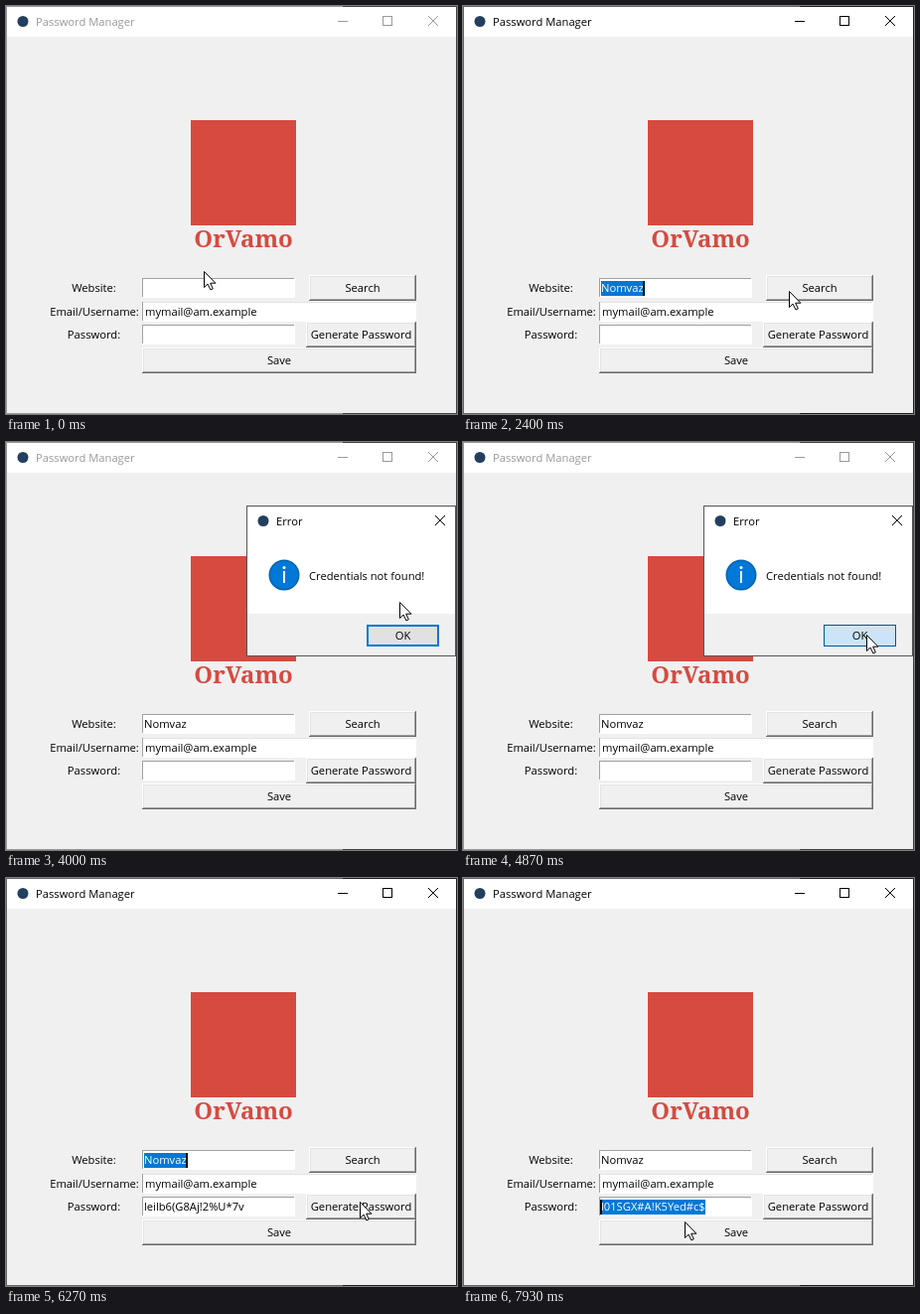
An HTML page with a canvas that plays this animation: 454 px wide and 411 px high, repeating every 8000 ms.

```html
<!DOCTYPE html>
<html lang="en">
<head>
<meta charset="utf-8">
<title>Password Manager</title>
<style>
  html, body { margin: 0; width: 100%; height: 100%; overflow: hidden; background: #f0f0f0; }
  canvas { display: block; width: 454px; height: 411px; }
</style>
</head>
<body>
<canvas id="stage" width="454" height="411"></canvas>
<script>
const ctx = document.getElementById('stage').getContext('2d');
const LOOP = 8000, RATE = 0.015;
const UI_FONT = '11.2px "Open Sans", "Noto Sans", sans-serif';
const RED = '#d64a40', BLUE = '#0078d7', FACE = '#f0f0f0', SHADE = '#a0a0a0';
const SITE = 'Nomvaz', EMAIL = 'mymail@am.example';

const ACTIVATE = 200, TYPE = 730, KEY_GAP = 120, SELECT = 1730;
const SEARCH = 3000, DIALOG_OPEN = 3200, OK_PRESS = 4870, DIALOG_CLOSE = 5000;
const PASSWORD_FOCUS = 7200, DRAG = 7270, DRAG_END = 7600;
const CLICK_HOLD = 66;

// Each click on the generate button yields the next password.
const clicks = [5600, 5930, 6200, 6530];
const passwords = ['lT4m#Zq9(wR2!eKs8', 'h7$Vd!3pXo*Bn6Yc', 'leilb6(G8Aj!2%U*7v', 'l01SGX#A!K5Yed#c$'];

const field = (x, y, w) => ({ x, y, w, h: 20 });
const fields = { site: field(137, 274, 154), email: field(137, 298, 276), password: field(137, 321, 154) };
const okButton = { x: 363, y: 184, w: 73, h: 22 };

const pointerMoves = [
  { at: 70, x: 207, y: 278 },
  { at: 2000, x: 344, y: 288, span: 600 },
  { at: 3470, x: 384, y: 119 },
  { at: 3800, x: 407, y: 194, span: 600 },
  { at: DIALOG_CLOSE, x: 357, y: 326 },
  { at: 6730, x: 254, y: 331 },
  { at: DRAG, x: 130, y: 331 },
  { at: DRAG_END, x: 224, y: 346 }
];

const easeOut = u => 1 - (1 - u) ** 2;
const blink = age => age % 900 < 600;
const hits = (r, x, y) => x >= r.x && x < r.x + r.w && y >= r.y && y < r.y + r.h;
const clamp = (v, lo, hi) => Math.min(hi, Math.max(lo, v));

function pointerAt(t) {
  let x = 200, y = 267;
  for (const { at, x: toX, y: toY, span = 330 } of pointerMoves) {
    const u = easeOut(clamp((t - at) / span, 0, 1));
    x += (toX - x) * u;
    y += (toY - y) * u;
  }
  return [Math.round(x), Math.round(y)];
}

function box(x, y, w, h, color) {
  ctx.fillStyle = color;
  ctx.fillRect(x, y, w, h);
}

function frame(x, y, w, h, color, line = 1) {
  ctx.strokeStyle = color;
  ctx.lineWidth = line;
  ctx.strokeRect(x + line / 2, y + line / 2, w - line, h - line);
}

function disc(x, y, r, color) {
  ctx.fillStyle = color;
  ctx.beginPath();
  ctx.arc(x, y, r, 0, Math.PI * 2);
  ctx.fill();
}

function text(str, x, y, color = '#000', align = 'left', font = UI_FONT) {
  ctx.font = font;
  ctx.textAlign = align;
  ctx.fillStyle = color;
  ctx.fillText(str, x, y);
}

function textWidth(str) {
  ctx.font = UI_FONT;
  return ctx.measureText(str).width;
}

function cross(x, y, color) {
  ctx.strokeStyle = color;
  ctx.lineWidth = 1;
  ctx.beginPath();
  ctx.moveTo(x, y);
  ctx.lineTo(x + 10, y + 10);
  ctx.moveTo(x + 10, y);
  ctx.lineTo(x, y + 10);
  ctx.stroke();
}

function edges(x, y, w, h, topLeft, bottomRight) {
  box(x, y, w, h, bottomRight);
  box(x, y, w - 1, h - 1, topLeft);
}

function button(label, x, y, w, pressed) {
  const h = 26, shift = pressed ? 1 : 0;
  if (pressed) {
    edges(x, y, w, h, '#696969', '#fff');
    edges(x + 1, y + 1, w - 2, h - 2, SHADE, '#e3e3e3');
  } else {
    edges(x, y, w, h, '#fff', '#696969');
    edges(x + 1, y + 1, w - 2, h - 2, '#e3e3e3', SHADE);
  }
  box(x + 2, y + 2, w - 4, h - 4, FACE);
  text(label, x + w / 2 + shift, y + 17 + shift, '#000', 'center');
}

function entry({ x, y, w, h }, str, { border = SHADE, pad = 2, from = 0, to = 0, caret = -1 } = {}) {
  edges(x, y, w, h, border, '#fff');
  box(x, y, 1, h - 1, SHADE);
  box(x + 1, y + 1, w - 2, h - 2, '#fff');
  const textX = x + pad, base = y + 14;
  const at = i => textX + textWidth(str.slice(0, i));
  text(str, textX, base);
  if (to > from) {
    const left = Math.round(at(from)), width = Math.ceil(at(to) - at(from));
    ctx.save();
    ctx.beginPath();
    ctx.rect(left, y + 3, width, 15);
    ctx.clip();
    box(left, y + 3, width, 15, BLUE);
    text(str, textX, base, '#fff');
    ctx.restore();
  }
  if (caret >= 0) box(Math.round(at(caret)) - 1, y + 3, 2, 15, '#000');
}

function mainWindow(active) {
  const ink = active ? '#000' : '#999', edge = active ? '#222' : '#444';
  box(0, 0, 454, 411, FACE);
  box(1, 1, 452, 30, '#fff');
  frame(0, 0, 454, 411, active ? '#666' : '#999');
  box(339, 0, 115, 1, edge);
  box(339, 410, 115, 1, edge);
  box(453, 0, 1, 411, edge);

  disc(17, 15.5, 5.5, '#233f5e');
  text('Password Manager', 30, 20, ink);
  box(334, 15, 10, 1, ink);
  frame(379, 10, 10, 10, ink);
  cross(425, 10, ink);

  box(186, 115, 106, 106, RED);
  text('OrVamo', 239, 243, RED, 'center', 'bold 24px "Noto Serif", serif');

  text('Website:', 88.5, 288, '#000', 'center');
  text('Email/Username:', 89, 312, '#000', 'center');
  text('Password:', 88.5, 335, '#000', 'center');
}

function dialog(pressed, hover) {
  box(242, 64, 211, 152, '#555');
  box(243, 65, 209, 108, '#fff');
  box(243, 173, 209, 42, FACE);
  disc(259, 79.5, 5.5, '#233f5e');
  text('Error', 272, 84);
  cross(432, 74, '#000');

  disc(280, 134, 15.5, '#0063b1');
  disc(280, 134, 14, BLUE);
  box(279, 130, 2, 12, '#fff');
  disc(280, 126.5, 1.5, '#fff');
  text('Credentials not found!', 305, 139);

  const { x, y, w, h } = okButton;
  box(x, y, w, h, pressed ? '#cce4f7' : hover ? '#e5f1fb' : '#e1e1e1');
  frame(x, y, w, h, pressed ? '#005499' : BLUE, pressed ? 1 : 2);
  text('OK', x + w / 2, y + 15, '#000', 'center');
}

function arrow(x, y) {
  ctx.save();
  ctx.translate(x - 0.5, y + 0.5);
  const outline = new Path2D('M0 0V16L3.6 12.6L6.4 18.4L8.8 17.3L6.2 11.7H11.4Z');
  ctx.fillStyle = '#fff';
  ctx.fill(outline);
  ctx.strokeStyle = '#000';
  ctx.lineWidth = 1;
  ctx.stroke(outline);
  ctx.restore();
}

function beam(x, y) {
  box(x, y - 7, 1, 14, '#000');
  for (const serifY of [y - 8, y + 7]) {
    box(x - 3, serifY, 3, 1, '#000');
    box(x + 1, serifY, 3, 1, '#000');
  }
}

function dragIndex(str, x) {
  const textX = fields.password.x + 2;
  let i = str.length;
  while (i > 0 && textX + textWidth(str.slice(0, i)) > x + 3) i--;
  return i;
}

function draw(t) {
  const [x, y] = pointerAt(t);
  const modal = t >= DIALOG_OPEN && t < DIALOG_CLOSE;
  const active = t >= ACTIVATE && !modal;
  const dragged = t >= DRAG + CLICK_HOLD;
  mainWindow(active);

  const typed = clamp(Math.floor((t - TYPE) / KEY_GAP) + 1, 0, SITE.length);
  const focus = t < DIALOG_OPEN ? 600 : DIALOG_CLOSE;
  entry(fields.site, SITE.slice(0, typed), {
    to: t >= SELECT && !modal && !dragged ? typed : 0,
    caret: active && t < PASSWORD_FOCUS && blink(t - focus) ? typed : -1
  });
  entry(fields.email, EMAIL, { border: '#e3e3e3', pad: 3 });

  const made = clicks.filter(c => t >= c + CLICK_HOLD).length;
  const password = made ? passwords[made - 1] : '';
  const start = dragged ? dragIndex(password, t < DRAG_END ? x : 0) : password.length;
  entry(fields.password, password, {
    from: start, to: password.length, caret: t >= PASSWORD_FOCUS ? start : -1
  });

  button('Search', 305, 271, 108, t >= SEARCH && t < DIALOG_OPEN);
  button('Generate Password', 302, 318, 111, clicks.some(c => t >= c && t < c + CLICK_HOLD));
  button('Save', 137, 344, 276, false);

  if (modal) dialog(t >= OK_PRESS, hits(okButton, x, y));
  const overField = Object.values(fields).some(f => hits(f, x, y));
  const dragging = t >= DRAG && t < DRAG_END + CLICK_HOLD;
  (overField || dragging ? beam : arrow)(x, y);
}

const started = performance.now();
function tick() {
  const t = (performance.now() - started) % LOOP;
  // The screen updates fifteen times a second.
  draw(Math.floor((t + 4) * RATE) / RATE + 4);
  requestAnimationFrame(tick);
}
tick();
</script>
</body>
</html>
```
